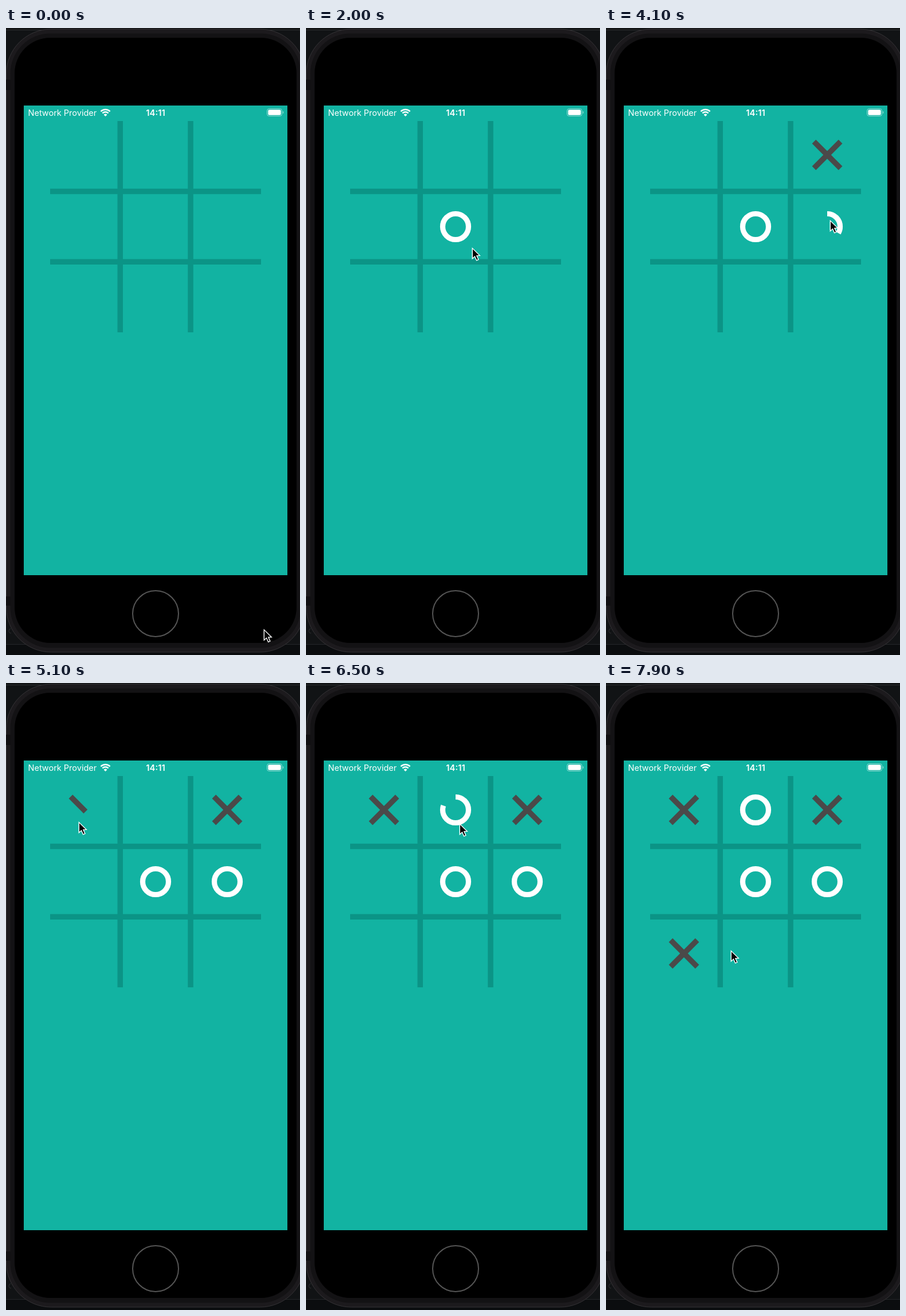
Write an HTML page with a canvas that moves like this. It is 513 by 1092 pixels and loops after 8 s.

```html
<!DOCTYPE html>
<html lang="en">
<head>
<meta charset="utf-8">
<title>Tic-tac-toe</title>
<style>
html, body { margin: 0; width: 100%; height: 100%; overflow: hidden; background: #111315; }
canvas { display: block; width: 513px; height: 1092px; }
</style>
</head>
<body>
<canvas id="stage"></canvas>
<script>
const W = 513, H = 1092, LOOP = 8000;
const TEAL = '#12b3a2', GRID = '#0b9486', CROSS = '#4b4949';
const canvas = document.getElementById('stage');
const ratio = window.devicePixelRatio || 1;
canvas.width = W * ratio;
canvas.height = H * ratio;
const ctx = canvas.getContext('2d');
ctx.scale(ratio, ratio);

const clamp = v => Math.max(0, Math.min(1, v));
const smooth = p => p * p * (3 - 2 * p);

const CIRCLE_MS = 300, STROKE_MS = 180;
const moves = [
  { kind: 'o', x: 261, y: 346, start: 1550 },
  { kind: 'x', x: 386, y: 221, start: 2700 },
  { kind: 'o', x: 386, y: 346, start: 4001 },
  { kind: 'x', x: 136, y: 221, start: 5000 },
  { kind: 'o', x: 261, y: 221, start: 6260 },
  { kind: 'x', x: 136, y: 471, start: 7430 }
];

// Pointer trips: begin, end, destination
const home = [450, 1047.5];
const trips = [
  [450, 1200, 290, 383],
  [2250, 2600, 363, 253],
  [3200, 3600, 391, 335],
  [4450, 4900, 127, 242],
  [5400, 5800, 268, 245],
  [6850, 7300, 130, 483],
  [7700, 7900, 218, 466]
];

function roundBox(x, y, w, h, r, fill, stroke, line = 1) {
  ctx.beginPath();
  ctx.roundRect(x, y, w, h, r);
  if (fill) {
    ctx.fillStyle = fill;
    ctx.fill();
  }
  if (stroke) {
    ctx.strokeStyle = stroke;
    ctx.lineWidth = line;
    ctx.stroke();
  }
}

function rect(x, y, w, h, color) {
  ctx.fillStyle = color;
  ctx.fillRect(x, y, w, h);
}

function arc(x, y, r, from, to, color, line) {
  ctx.beginPath();
  ctx.arc(x, y, r, from, to);
  ctx.strokeStyle = color;
  ctx.lineWidth = line;
  ctx.stroke();
}

function drawPhone() {
  rect(0, 0, W, H, '#111315');
  rect(0, 3, W, 1, '#2c2e30');
  rect(0, 1073, W, 1, '#25272a');
  rect(0, 1074, W, 18, '#0b0d0f');
  arc(9, 1050, 4, 1.6, 4.5, '#303235', 1);
  roundBox(0.5, 2, 521, 1085, 78, '#1c1a1d', '#353336', 1);
  roundBox(7.5, 9.5, 507, 1070, 70, '#131214');
  rect(0, 90, 8, 18, '#111013');
  rect(0, 990, 8, 16, '#111013');
  roundBox(15, 17, 492, 1054, 62, '#000');
  arc(261, 1020, 40, 0, Math.PI * 2, '#555', 2);
}

function drawStatus() {
  ctx.fillStyle = '#fff';
  ctx.textBaseline = 'alphabetic';
  ctx.textAlign = 'left';
  ctx.font = '400 14.5px Inter, sans-serif';
  ctx.fillText('Network Provider', 38.5, 153);
  ctx.textAlign = 'center';
  ctx.font = '600 14.8px Inter, sans-serif';
  ctx.fillText('14:11', 261, 153);

  const up = -Math.PI / 2, spread = 0.78;
  for (const r of [11.5, 7.3]) {
    arc(173.5, 153.5, r, up - spread, up + spread, '#fff', 2.5);
  }
  ctx.beginPath();
  ctx.moveTo(173.5, 154);
  ctx.arc(173.5, 154, 4.2, up - spread, up + spread);
  ctx.fill();

  roundBox(455.5, 140.5, 26, 13, 3.8, null, 'rgba(255,255,255,.5)');
  roundBox(457.3, 142.3, 22.4, 9.4, 2.3, '#fff');
  roundBox(483, 145, 1.3, 4, 0.7, 'rgba(255,255,255,.5)');
}

function drawBoard() {
  rect(31, 135, 460, 818, TEAL);
  for (const x of [194.5, 317.3]) rect(x, 162, 9.5, 368, GRID);
  for (const y of [279.8, 402.5]) rect(77, y, 368, 9.5, GRID);
  drawStatus();
}

function slash(x, y, dir, p) {
  if (p <= 0) return;
  const d = 23.1, len = 2 * d * p;
  ctx.beginPath();
  ctx.moveTo(x - d * dir, y - d);
  ctx.lineTo(x + (len - d) * dir, y - d + len);
  ctx.strokeStyle = CROSS;
  ctx.lineWidth = 9.5;
  ctx.stroke();
}

function drawMark({ kind, x, y, start }, t) {
  const age = t - start;
  if (age <= 0) return;
  if (kind === 'o') {
    const p = clamp(age / CIRCLE_MS), up = -Math.PI / 2;
    arc(x, y, 22.5, up, up + Math.PI * 2 * p, '#fff', 9.2);
  } else {
    slash(x, y, 1, clamp(age / STROKE_MS));
    slash(x, y, -1, clamp(age / STROKE_MS - 1));
  }
}

function pointerAt(t) {
  let [x, y] = home;
  for (const [begin, end, toX, toY] of trips) {
    if (t <= begin) break;
    const p = smooth(clamp((t - begin) / (end - begin)));
    x += (toX - x) * p;
    y += (toY - y) * p;
  }
  return [x, y];
}

function drawPointer(t) {
  const [x, y] = pointerAt(t);
  ctx.save();
  ctx.translate(x + 0.3, y + 0.6);
  ctx.beginPath();
  ctx.moveTo(0, 0);
  [[0, 18], [4.2, 14.2], [7.3, 21.2], [10.6, 19.8], [7.6, 13], [13, 12.7]]
    .forEach(([px, py]) => ctx.lineTo(px, py));
  ctx.closePath();
  ctx.fillStyle = '#000';
  ctx.strokeStyle = '#fff';
  ctx.lineWidth = 1.4;
  ctx.lineJoin = 'miter';
  ctx.fill();
  ctx.stroke();
  ctx.restore();
}

const origin = performance.now();
function frame(now) {
  const t = Math.max(0, now - origin) % LOOP;
  drawPhone();
  drawBoard();
  moves.forEach(m => drawMark(m, t));
  drawPointer(t);
  requestAnimationFrame(frame);
}
frame(origin);
</script>
</body>
</html>
```
